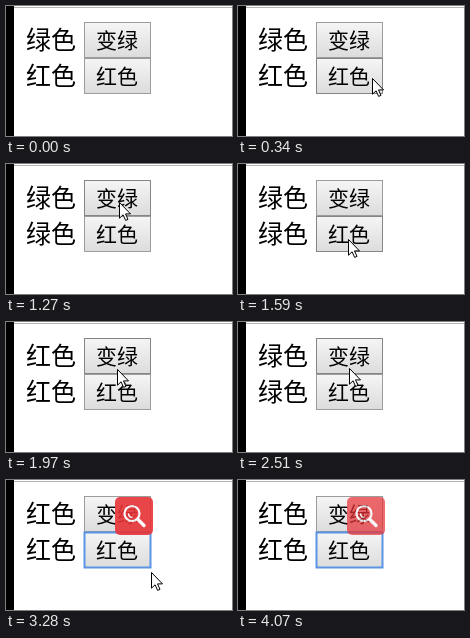
An HTML page that plays this animation: 226 by 130 pixels, repeating every 4.15 s.

```html
<!DOCTYPE html>
<html lang="zh-CN">
<head>
<meta charset="utf-8">
<style>
  html, body { margin: 0; width: 100%; height: 100%; overflow: hidden; background: #fff; }
  svg { display: block; }
  text { font: 350 25px "Noto Sans CJK SC", "Noto Sans CJK", sans-serif; fill: #000; }
  .btn text { font-size: 21px; }
  .btn rect { fill: url(#up); stroke: #9c9c9c; }
  .btn.hover rect { stroke: #858585; }
  .btn.down rect { fill: url(#down); }
  .btn.focus rect { stroke: #5b94e6; stroke-width: 2; }
</style>
</head>
<body>
<svg width="226" height="130" viewBox="0 0 226 130">
  <defs>
    <linearGradient id="up" x2="0" y2="1"><stop stop-color="#f5f5f5"/><stop offset="1" stop-color="#dcdcdc"/></linearGradient>
    <linearGradient id="down" x2="0" y2="1"><stop stop-color="#dcdcdc"/><stop offset="1" stop-color="#f0f0f0"/></linearGradient>
  </defs>
  <path d="M8 1.5H226" stroke="#b4b4b4"/>
  <path d="M0 0H8V130H0Z"/>
  <text id="row1" x="20" y="43"></text>
  <text id="row2" x="20" y="79"></text>
  <g class="btn"><rect x="78.5" y="16.5" width="66" height="35"/><text x="90" y="42">变绿</text></g>
  <g class="btn"><rect x="78.5" y="52.5" width="66" height="35"/><text x="90" y="78">红色</text></g>
  <g id="badge">
    <rect x="109" y="17" width="38" height="38" rx="5" fill="#e83438"/>
    <g fill="none" stroke="#fff" stroke-width="2.2" stroke-linecap="round">
      <circle cx="126" cy="33.5" r="7.5"/>
      <path d="M132 39.5L138 45.5" stroke-width="3.4"/>
      <path d="M122.5 34a3.8 3.8 0 0 0 3.5 3.5" stroke-width="1.3"/>
    </g>
  </g>
  <path id="cursor" d="M.5 .5V16.2L4.1 12.8L6.6 18.4L9 17.4L6.5 11.9H11.5Z" fill="#fff" stroke="#000"/>
</svg>
<script>
const $ = id => document.getElementById(id);
const buttons = document.querySelectorAll('.btn');
const LOOP = 4150, STEP = 77;

const easeIn = u => u ** 1.7;
const easeOut = u => 1 - (1 - u) ** 2;
const easeInOut = u => u * u * (3 - 2 * u);

// The pointer enters at `entry`, then makes these moves, resting in between.
const entry = { x: 159, y: 118 };
const moves = [
  { from: 120, to: 570, x: 114, y: 35, ease: easeOut },
  { from: 590, to: 670, x: 113, y: 31, ease: easeOut },
  { from: 950, to: 1040, x: 113, y: 38, ease: easeOut },
  { from: 1270, to: 1420, x: 110, y: 75, ease: easeInOut },
  { from: 1810, to: 2130, x: 111, y: 37, ease: easeOut },
  { from: 2430, to: 2670, x: 110, y: 70, ease: easeInOut },
  { from: 2970, to: 3360, x: 194, y: 122, ease: easeIn }
];
const presses = [
  { down: 950, up: 1040, button: 0 },
  { down: 1670, up: 1740, button: 1 },
  { down: 2280, up: 2360, button: 0 },
  { down: 2740, up: 2820, button: 1 }
];
const fades = [3750, 4070];

// The screen is sampled about every STEP ms, so each move advances in even steps.
function pointerAt(t) {
  let { x, y } = entry;
  for (const m of moves) {
    if (t < m.from) break;
    const n = Math.round((m.to - m.from) / STEP);
    const u = m.ease(Math.min(1, Math.floor((t - m.from) * n / (m.to - m.from)) / n));
    x += (m.x - x) * u;
    y += (m.y - y) * u;
  }
  return { x: Math.round(x), y: Math.round(y) };
}

const word = green => green ? '绿色' : '红色';

function draw(t) {
  const { x, y } = pointerAt(t);
  const shown = t >= 120 && t < 3430;
  $('cursor').style.display = shown ? '' : 'none';
  $('cursor').setAttribute('transform', `translate(${x} ${y})`);

  const last = presses.findLast(p => p.up <= t);
  $('row1').textContent = word(!last || last.button === 0);
  $('row2').textContent = word(last && last.button === 0);

  buttons.forEach((b, i) => {
    const top = 16 + 36 * i;
    const over = shown && x >= 78 && x < 145 && y >= top && y < top + 36;
    b.classList.toggle('hover', over);
    b.classList.toggle('down', presses.some(p => p.button === i && t >= p.down && t < p.up));
    b.classList.toggle('focus', i === 1 && t >= 3130);
  });

  $('badge').style.opacity = t < 2820 ? 0 : .9 - .09 * fades.filter(f => t >= f).length;
}

const start = performance.now();
function tick() {
  draw((performance.now() - start) % LOOP);
  requestAnimationFrame(tick);
}
tick();
</script>
</body>
</html>
```
